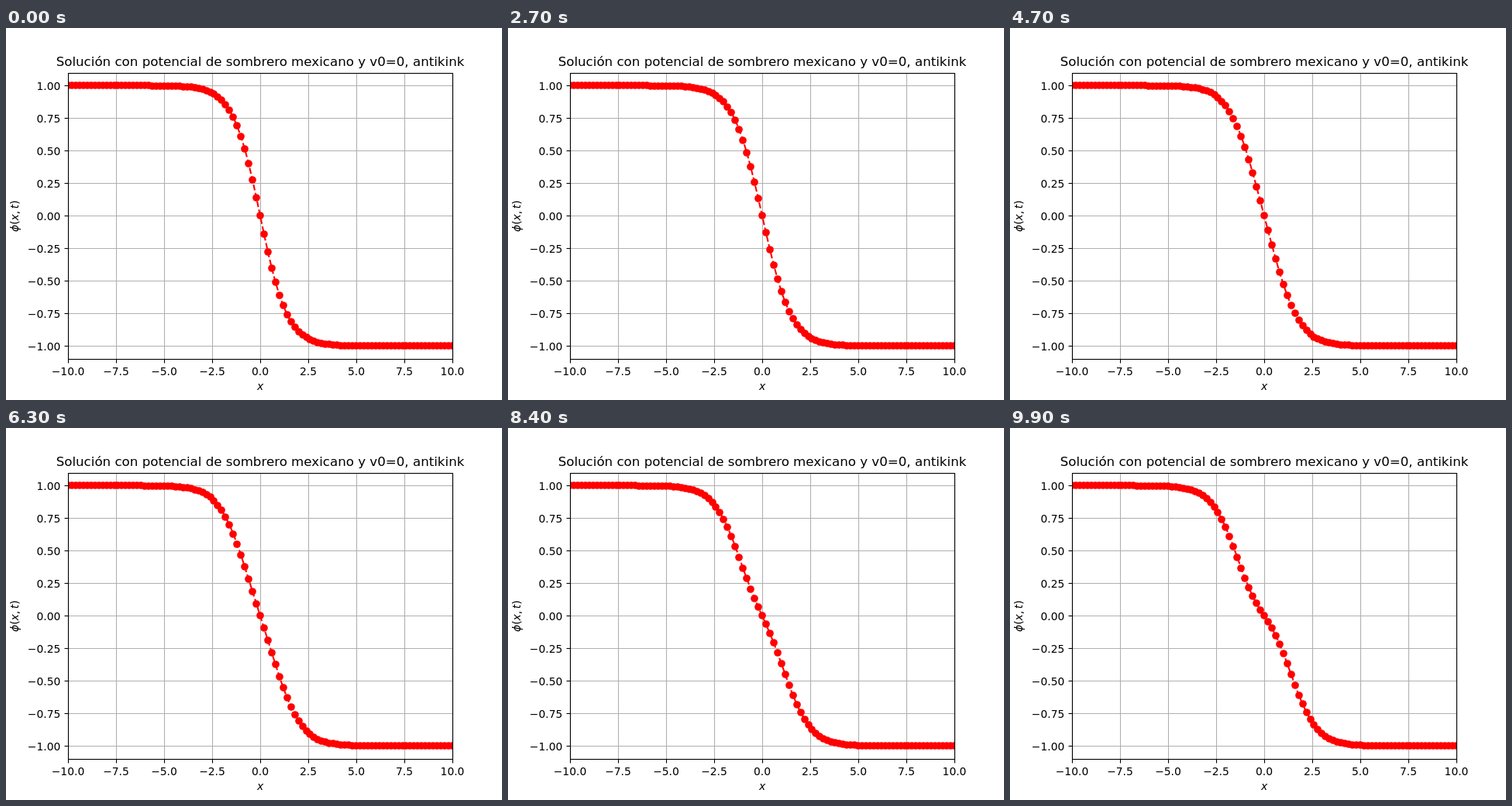
These frames come from a looping animation (640x480 px, 10 s). An HTML page with a canvas:

```html
<!DOCTYPE html>
<html lang="es">
<head>
<meta charset="utf-8">
<style>
  html, body { margin: 0; width: 100%; height: 100%; overflow: hidden; background: #fff; }
  canvas { display: block; }
</style>
</head>
<body>
<canvas id="plot" width="640" height="480"></canvas>
<script>
const ctx = document.getElementById('plot').getContext('2d');
const FONT = '"DejaVu Sans", sans-serif';
const PT = 100 / 72;
const LEFT = 80, RIGHT = 576, TOP = 58.5, BOTTOM = 427.5;
const STEPS = 100, STEP_MS = 100;
const DX = 0.2, DT = 0.01;
const px = x => 328 + 24.8 * x;
const py = y => 242.4 - 168 * y;
const snap = v => Math.round(v) + 0.5;

// Leapfrog solution of u_tt = u_xx - u + u^3, starting at rest.
function solve() {
  const accel = u => u.map((v, i) => i && i < u.length - 1
    ? (u[i - 1] - 2 * v + u[i + 1]) / DX ** 2 - v + v ** 3 : 0);
  let u = Array.from({ length: 101 }, (_, i) => -Math.tanh((i - 50) * DX / Math.SQRT2));
  let a = accel(u);
  let prev = u.map((v, i) => v + a[i] * DT * DT / 2);
  const states = [];
  for (let n = 0; n < STEPS; n++) {
    states.push(u);
    a = accel(u);
    const next = u.map((v, i) => 2 * v - prev[i] + a[i] * DT * DT);
    prev = u;
    u = next;
  }
  return states;
}
const states = solve();

function line(x1, y1, x2, y2, color) {
  ctx.strokeStyle = color;
  ctx.lineWidth = 0.8 * PT;
  ctx.beginPath();
  ctx.moveTo(x1, y1);
  ctx.lineTo(x2, y2);
  ctx.stroke();
}

function text(str, x, y, align = 'center', size = 10, style = '') {
  ctx.font = `${style} ${size * PT}px ${FONT}`;
  ctx.textAlign = align;
  ctx.fillStyle = '#000';
  ctx.fillText(str, x, y);
}

const label = (v, digits) => v.toFixed(digits).replace('-', '\u2212');

function axes() {
  for (let i = -4; i <= 4; i++) {
    const x = snap(px(i * 2.5)), y = snap(py(i / 4));
    line(x, TOP, x, BOTTOM, '#b0b0b0');
    line(x, BOTTOM, x, 432.5, '#000');
    text(label(i * 2.5, 1), px(i * 2.5), 448);
    line(LEFT + 0.5, y, RIGHT + 0.5, y, '#b0b0b0');
    line(75.5, y, LEFT + 0.5, y, '#000');
    text(label(i / 4, 2), 70.3, Math.round(py(i / 4) + 5.3), 'right');
  }
  text('Solución con potencial de sombrero mexicano y v0=0, antikink', 328, 49, 'center', 12);
  text('x', 328, 467, 'center', 10, 'italic');

  ctx.save();
  ctx.translate(16, 263);
  ctx.rotate(-Math.PI / 2);
  let x = 0;
  for (const [str, style, gap] of [['ϕ', 'italic', 0], ['(', '', 0], ['x', 'italic', 0],
    [',', '', 2.6], ['t', 'italic', 0], [')', '', 0]]) {
    text(str, x, 0, 'left', 10, style);
    x += ctx.measureText(str).width + gap;
  }
  ctx.restore();
}

function curve(u) {
  ctx.save();
  ctx.beginPath();
  ctx.rect(LEFT, 57.6, RIGHT - LEFT, 369.6);
  ctx.clip();
  ctx.strokeStyle = ctx.fillStyle = '#f00';
  ctx.lineWidth = 1.5 * PT;
  ctx.lineJoin = 'round';
  ctx.setLineDash([5.55 * PT, 2.4 * PT]);
  ctx.beginPath();
  u.forEach((v, i) => ctx.lineTo(px((i - 50) * DX), py(v)));
  ctx.stroke();
  u.forEach((v, i) => {
    ctx.beginPath();
    ctx.arc(Math.round(px((i - 50) * DX)), Math.round(py(v)), 3.5 * PT, 0, 2 * Math.PI);
    ctx.fill();
  });
  ctx.restore();
}

function draw(now) {
  ctx.fillStyle = '#fff';
  ctx.fillRect(0, 0, 640, 480);
  axes();
  curve(states[Math.floor((now - start) / STEP_MS) % STEPS]);
  ctx.strokeStyle = '#000';
  ctx.lineWidth = 0.8 * PT;
  ctx.strokeRect(LEFT + 0.5, TOP, RIGHT - LEFT, BOTTOM - TOP);
}

const start = performance.now();
function tick() {
  draw(performance.now());
  requestAnimationFrame(tick);
}
tick();
</script>
</body>
</html>
```
